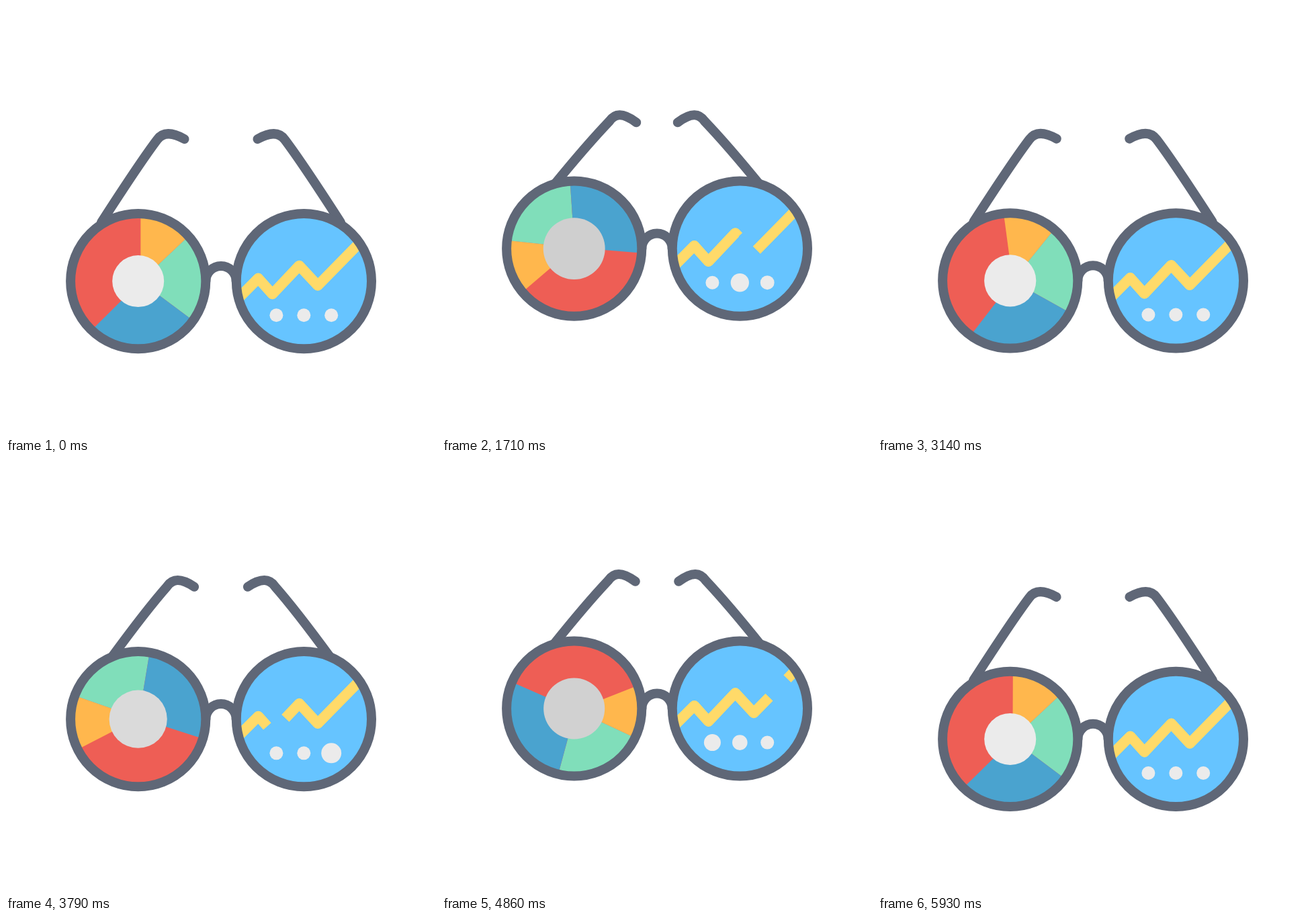
These frames come from a looping animation (640 by 640 pixels, 6000 ms). An HTML page with a canvas:

```html
<!DOCTYPE html>
<html lang="en">
<head>
<meta charset="utf-8">
<title>Data glasses</title>
<style>
html, body { margin: 0; width: 100%; height: 100%; overflow: hidden; background: #fff; }
canvas { display: block; width: 640px; height: 640px; }
</style>
</head>
<body>
<canvas id="stage" width="640" height="640"></canvas>
<script>
const ctx = document.getElementById('stage').getContext('2d');
const LOOP = 6000, HALF = 3000, TAU = Math.PI * 2;
const FRAME = '#5f6777', LIGHT = '#ebebeb';
const LEFT = 196.7, RIGHT = 443.4, INNER = 94;

// Cubic timing curve with end heights 0 and 1
function ease(x, a, b) {
  let lo = 0, hi = 1;
  for (let i = 0; i < 24; i++) {
    const s = (lo + hi) / 2, r = 1 - s;
    if (3 * a * s * r * r + 3 * (1 - b) * s * s * r + s * s * s < x) lo = s; else hi = s;
  }
  return lo * lo * (3 - 2 * lo);
}

// 0 = glasses low, 1 = glasses raised
function liftAt(t) {
  const x = (t % 1500) / 1500;
  switch (Math.floor(t / 1500)) {
    case 0: return ease(x, 0.45, 0.5);
    case 1: return 1 - ease(x, 0.5, 0.52);
    case 2: return ease(x, 0.47, 0.53);
    default: return 1 - ease(x, 0.53, 0.5);
  }
}

function spinAt(t) {
  const x = (t % HALF) / HALF;
  return TAU * (t < HALF ? ease(x, 0.5, 0.5) : 1 - ease(x, 1 / 6, 0.5));
}

function disc(x, y, r, fill) {
  ctx.beginPath();
  ctx.arc(x, y, r, 0, TAU);
  ctx.fillStyle = fill;
  ctx.fill();
}

function inLens(x, y, draw) {
  ctx.save();
  ctx.beginPath();
  ctx.arc(x, y, INNER + 1, 0, TAU);
  ctx.clip();
  draw();
  ctx.restore();
}

function ring(x, y) {
  ctx.beginPath();
  ctx.arc(x, y, 100.6, 0, TAU);
  ctx.stroke();
}

const LOW = [142, 322, 200, 232, 225, 199, 233, 188, 246, 187, 265.5, 198];
const HIGH = [168, 264, 215, 207, 249.5, 171, 258, 159, 269, 157, 290, 172.5];

function arm(lift) {
  const p = LOW.map((v, i) => v + (HIGH[i] - v) * lift);
  ctx.beginPath();
  ctx.moveTo(p[0], p[1]);
  ctx.quadraticCurveTo(...p.slice(2, 6));
  ctx.bezierCurveTo(...p.slice(6));
  ctx.stroke();
}

const SLICES = [
  [0, -94, '#ffb74d'],
  [66.5, -63, '#80deba'],
  [72.5, 54, '#4aa3cf'],
  [-67.5, 67, '#ee5e55']
];

function pie(cy, spin, lift) {
  ctx.save();
  ctx.translate(LEFT + 1.6, cy + 0.2);
  ctx.rotate(spin);
  ctx.translate(2.1, 0.3);
  const angles = SLICES.map(s => Math.atan2(s[1], s[0]));
  disc(0, 0, 110, SLICES[3][2]);
  for (let i = 0; i < 3; i++) {
    ctx.beginPath();
    ctx.moveTo(0, 0);
    ctx.arc(0, 0, 110, angles[i], angles[i + 1]);
    ctx.fillStyle = SLICES[i][2];
    ctx.fill();
  }
  ctx.restore();
  const g = Math.round(235 - 29 * lift);
  disc(LEFT, cy, 38.5 + 7.7 * lift, `rgb(${g},${g},${g})`);
}

// Trend line, heights relative to the lens centre
const TREND = [[335, 36.4], [375.5, -4.3], [396.5, 19.2], [436.5, -23.2], [464, 6.5], [545, -76]];

function trendY(x) {
  const i = TREND.findIndex(p => p[0] >= x);
  const [x0, y0] = TREND[i - 1], [x1, y1] = TREND[i];
  return y0 + (y1 - y0) * (x - x0) / (x1 - x0);
}

function trend(from, to, cy) {
  from = Math.max(from, 336);
  to = Math.min(to, 544);
  if (to <= from) return;
  ctx.beginPath();
  ctx.moveTo(from, cy + trendY(from));
  for (const [x, y] of TREND) if (x > from && x < to) ctx.lineTo(x, cy + y);
  ctx.lineTo(to, cy + trendY(to));
  ctx.stroke();
}

function chart(cy, u) {
  disc(RIGHT, cy, INNER + 2, '#66c4ff');
  const gap = 527 - 165 * Math.pow(u / 2429, 1.87);
  ctx.lineWidth = 15.5;
  ctx.lineCap = 'butt';
  ctx.lineJoin = 'round';
  ctx.strokeStyle = '#ffda69';
  trend(0, gap, cy);
  trend(gap + 27, 640, cy);
  for (let i = 0; i < 3; i++) {
    const d = Math.min(1, Math.abs(u - 855 - 660 * i) / 570);
    disc(402.4 + 40.9 * i, cy + 50.6, 10 + 2.5 * (1 + Math.cos(Math.PI * d)), LIGHT);
  }
}

function draw(t) {
  const lift = liftAt(t), cy = 409.6 - 50 * lift;
  const u = t < HALF ? t : LOOP - t;
  ctx.fillStyle = '#fff';
  ctx.fillRect(0, 0, 640, 640);

  ctx.strokeStyle = FRAME;
  ctx.lineWidth = 14;
  ctx.lineCap = 'round';
  ctx.lineJoin = 'round';
  arm(lift);
  ctx.save();
  ctx.translate(640, 0);
  ctx.scale(-1, 1);
  arm(lift);
  ctx.restore();
  ctx.beginPath();
  ctx.arc(320, cy, 22.6, Math.PI, TAU);
  ctx.stroke();

  inLens(LEFT, cy, () => pie(cy, spinAt(t), lift));
  inLens(RIGHT, cy, () => chart(cy, u));
  ring(LEFT, cy);
  ring(RIGHT, cy);
}

const start = performance.now();
function tick() {
  draw((performance.now() - start) % LOOP);
  requestAnimationFrame(tick);
}
tick();
</script>
</body>
</html>
```
